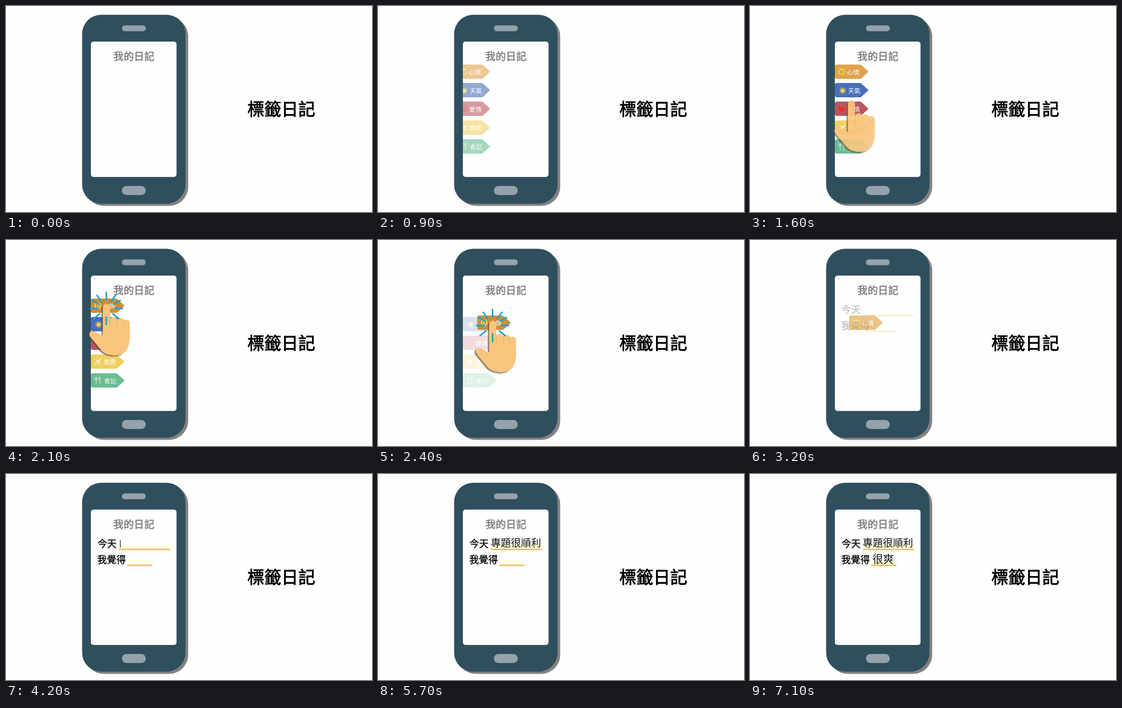
An HTML page for the animation above (8 s loop, 690x388 px).

```html
<!DOCTYPE html>
<html lang="zh-TW">
<head>
<meta charset="utf-8">
<title>標籤日記</title>
<style>
html, body { margin: 0; width: 100%; height: 100%; overflow: hidden; background: #fefefe; }
svg { display: block; width: 100%; height: 100%; }
text { font-family: "Noto Sans CJK TC", "Noto Sans CJK", sans-serif; font-weight: 500; }

.title { font-size: 32px; stroke: #000; stroke-width: .9px; }
.head { font-size: 19px; letter-spacing: .4px; fill: #7f7f7f; stroke: #7f7f7f; stroke-width: .6px; }
.label { font-size: 18px; stroke: #000; stroke-width: .35px; }
.typed { font-size: 19px; font-weight: 300; fill: #111; }
.tag text { font-size: 11.5px; fill: #fff; }

/* 1.25% of the loop is one 100 ms step */
.anim { animation: 8s step-end infinite; }
.tags { animation-name: enter; }
.others { animation-name: dissolve; }
.others .tag { transform-origin: 160px 0; }
.shrink { animation-name: shrink; }
.mood { animation-name: drag; }
.press { animation-name: press; }
.hand { animation-name: hand; }
.burst { animation-name: burst; }
.form { animation-name: form; }
.caret1 { animation-name: caret1; }
.caret2 { animation-name: caret2; }
.line1 { animation-name: type; }
.line2 { animation-name: show; }

@keyframes enter {
  0% { opacity: 0; transform: translateX(-30px); }
  7.5% { opacity: 0; transform: translateX(-30px); animation-timing-function: steps(5); }
  13.75%, 100% { opacity: 1; transform: none; }
}
@keyframes dissolve {
  0% { opacity: 1; }
  27.5% { opacity: 1; animation-timing-function: steps(2); }
  30% { opacity: .2; animation-timing-function: steps(4); }
  35% { opacity: .16; animation-timing-function: steps(3); }
  38.75%, 100% { opacity: 0; }
}
@keyframes shrink {
  0% { transform: scale(1); }
  30% { transform: scale(1); animation-timing-function: steps(7); }
  38.75%, 100% { transform: scale(.56); }
}
@keyframes drag {
  0% { transform: none; opacity: 1; }
  27.5% { transform: none; opacity: 1; animation-timing-function: steps(2); }
  30% { transform: translate(27px, 32px); opacity: 1; animation-timing-function: steps(4); }
  35% { transform: translate(27px, 32px); opacity: .85; }
  38.75% { transform: translate(27px, 32px); opacity: .85; animation-timing-function: steps(4); }
  43.75%, 100% { transform: translate(27px, 32px); opacity: 0; }
}
@keyframes press {
  0% { fill: #dfa34c; }
  25% { fill: #c88f3c; }
  31.25%, 100% { fill: #e0a144; }
}
@keyframes hand {
  0% { transform: translate(192px, 320px); opacity: 0; }
  17.5% { transform: translate(192px, 291px); opacity: .4; }
  18.75% { transform: translate(192px, 230px); opacity: .75; }
  20% { transform: translate(191px, 177.5px); opacity: .92; }
  21.25% { transform: translate(190px, 144px); opacity: 1; }
  22.5% { transform: translate(189px, 126px); opacity: 1; }
  23.75% { transform: translate(189px, 120px); opacity: 1; }
  27.5% { transform: translate(189px, 120px); opacity: 1; animation-timing-function: steps(2); }
  30% { transform: translate(216px, 152px); opacity: 1; animation-timing-function: steps(4); }
  35% { transform: translate(239px, 262px); opacity: .02; }
  36.25%, 100% { transform: translate(239px, 262px); opacity: 0; }
}
@keyframes burst {
  0% { opacity: 0; }
  25% { opacity: 1; }
  31.25%, 100% { opacity: 0; }
}
@keyframes form {
  0% { opacity: 0; }
  38.75% { opacity: 0; animation-timing-function: steps(4); }
  43.75%, 100% { opacity: 1; }
}
@keyframes caret1 {
  0%, 47.5%, 56.25% { opacity: 0; }
  43.75%, 52.5%, 60% { opacity: 1; }
  65%, 100% { opacity: 0; }
}
@keyframes caret2 {
  0%, 80% { opacity: 0; }
  76.25%, 83.75% { opacity: 1; }
  88.75%, 100% { opacity: 0; }
}
@keyframes type {
  0% { clip-path: inset(-5px 100% -5px 0); }
  65% { clip-path: inset(-5px 100% -5px 0); animation-timing-function: steps(5); }
  71.25%, 100% { clip-path: inset(-5px 0 -5px 0); }
}
@keyframes show {
  0% { opacity: 0; }
  88.75%, 100% { opacity: 1; }
}
</style>
</head>
<body>
<svg viewBox="0 0 690 388" preserveAspectRatio="none">
  <defs>
    <clipPath id="screen"><rect x="160" y="67" width="161.500" height="255" rx="5"/></clipPath>
    <path id="shape" d="M164 -13.500H207Q209 -13.500 210.500 -12L223.500 0L210.500 12Q209 13.500 207 13.500H164Q160 13.500 160 9.500V-9.500Q160 -13.500 164 -13.500Z"/>
    <path id="palm" d="M-6.500 7C-6.500 -2 7 -2 7 7V29C9 23 20 23 20 30C23 25 33 26 33 32C36 28 44.500 30 44.500 37V62
      C44.500 83 36 97.500 18 97.500C7 97.500 -2 95 -9 88L-28 65C-37 54 -28 49 -20 53L-6.500 60Z"/>
    <path id="ray" d="M0 -15V-31.500"/>
  </defs>

  <rect x="148.500" y="21" width="195" height="355.500" rx="36" fill="#858282"/>
  <rect x="143.500" y="16.500" width="195" height="356" rx="36" fill="#304f5e"/>
  <rect x="218.500" y="36.500" width="45" height="11" rx="5.500" fill="#95a2ab"/>
  <rect x="218.500" y="339" width="45" height="17" rx="8.500" fill="#95a2ab"/>
  <rect x="160" y="67" width="161.500" height="255" rx="5" fill="#fefefe"/>

  <text class="head" x="202.500" y="102">我的日記</text>
  <text class="title" x="455" y="206">標籤日記</text>

  <g class="anim form">
    <text class="label" x="172.500" y="138">今天</text>
    <text class="label" x="172" y="167.500">我覺得</text>
    <path d="M213 142H309.500M228.500 172H276" stroke="#f3bd2c" stroke-width="2.500"/>
  </g>
  <path class="anim caret1" d="M215.500 124.500V138.500" stroke="#222" stroke-width="1.300"/>
  <path class="anim caret2" d="M230.500 153.500V167.500" stroke="#222" stroke-width="1.300"/>
  <text class="anim typed line1" x="212.500" y="136.500">專題很順利</text>
  <text class="anim typed line2" x="231" y="167.500" style="font-size:20px">很爽</text>

  <g clip-path="url(#screen)">
    <g class="anim tags">
      <g class="anim others">
        <g transform="translate(0 158.500)"><g class="tag anim shrink">
          <use href="#shape" fill="#486fba"/>
          <circle cx="174.500" cy="1" r="5.600" fill="none" stroke="#f6c244" stroke-width="2" stroke-dasharray="1.500 2.900"/>
          <circle cx="174.500" cy="1" r="3.900" fill="#fbd04d"/>
          <text x="185" y="5">天氣</text>
        </g></g>
        <g transform="translate(0 193.500)"><g class="tag anim shrink">
          <use href="#shape" fill="#bb565f"/>
          <path d="M173 7C163 0 167 -6 173 -2C179 -6 183 0 173 7Z" fill="#ee2b2b"/>
          <text x="184" y="5">愛情</text>
        </g></g>
        <g transform="translate(0 229)"><g class="tag anim shrink">
          <use href="#shape" fill="#f0d064"/>
          <path d="M167 5L179 -5M169 -3L176 -1L175 6" fill="none" stroke="#fff" stroke-width="1.300"/>
          <text x="184" y="5">旅遊</text>
        </g></g>
        <g transform="translate(0 264.500)"><g class="tag anim shrink">
          <use href="#shape" fill="#6bbd91"/>
          <path d="M170 -6V7M168 -6V-2H172V-6M177 7V-6Q174 -3 177 1" fill="none" stroke="#dfe6e6" stroke-width="1.100"/>
          <text x="185" y="5">食記</text>
        </g></g>
      </g>
      <g class="anim mood">
        <g class="tag" transform="translate(0 123.700)">
          <use class="anim press" href="#shape"/>
          <circle cx="173" cy="0" r="6.300" fill="#fbd354"/>
          <path d="M169 -2L172 -1M177 -2L174 -1" stroke="#6b4312" stroke-width="1.200"/>
          <path d="M169.500 1.500H176.500Q173 7 169.500 1.500Z" fill="#fff" stroke="#6b4312" stroke-width=".8"/>
          <text x="183" y="5">心情</text>
        </g>
      </g>
    </g>
  </g>

  <g class="anim hand">
    <use href="#palm" x="-2.500" y="2" fill="#5b4a3a" opacity=".65"/>
    <use href="#palm" fill="#f8c67f"/>
    <path d="M7 28V44M20 31V44M33 33V44" stroke="#e9b268" stroke-width="1.200" stroke-linecap="round"/>
    <g class="anim burst" stroke="#1aa0d8" stroke-width="2.800">
      <g transform="translate(0 9)">
        <use href="#ray"/>
        <use href="#ray" transform="rotate(35)"/>
        <use href="#ray" transform="rotate(60)"/>
        <use href="#ray" transform="rotate(90)"/>
        <use href="#ray" transform="rotate(129)"/>
        <use href="#ray" transform="rotate(180)"/>
        <use href="#ray" transform="rotate(231)"/>
        <use href="#ray" transform="rotate(270)"/>
        <use href="#ray" transform="rotate(300)"/>
        <use href="#ray" transform="rotate(325)"/>
      </g>
    </g>
  </g>
</svg>
</body>
</html>
```
